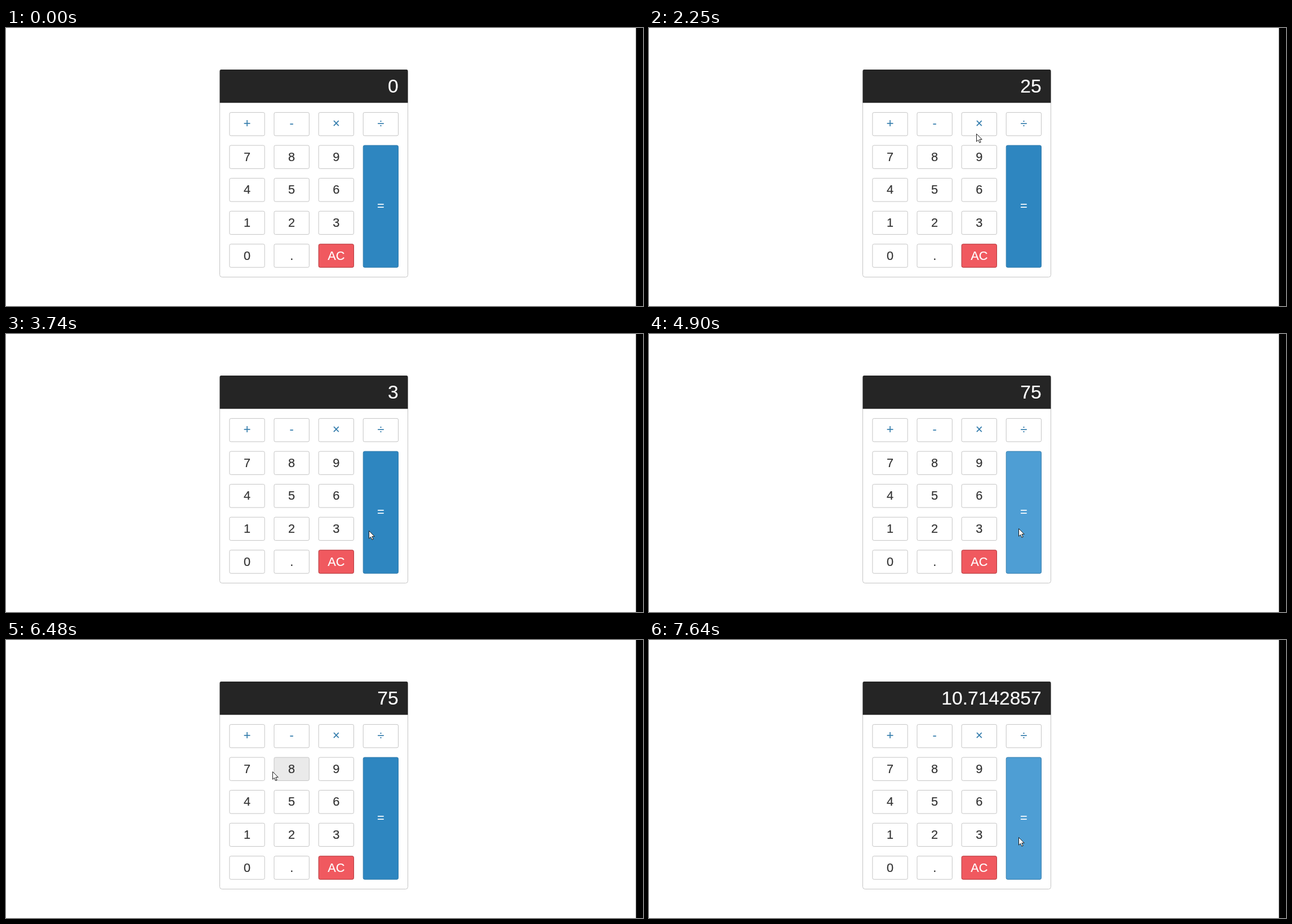
Animation of 1131 by 495 pixels, one loop 8 s. Source, as an HTML page:

```html
<!DOCTYPE html>
<html lang="en">
<head>
<meta charset="utf-8">
<title>Calculator</title>
<style>
  html, body { margin: 0; width: 100%; height: 100%; overflow: hidden; background: #fff; }
  svg { display: block; width: 100%; height: 100%; }
  text {
    font-family: "Liberation Sans", Arial, sans-serif; font-size: 21.7px; text-anchor: middle;
    fill: currentColor; stroke: currentColor; stroke-width: .2px;
  }
  #value { font-size: 33.6px; text-anchor: end; color: #fff; }
</style>
</head>
<body>
<svg viewBox="0 0 1131 495" xmlns="http://www.w3.org/2000/svg">
  <rect x="1118.5" width="12.5" height="495" fill="#000"/>
  <rect x="379.5" y="74.5" width="334" height="369" rx="4" fill="#fff" stroke="#c4c4c4"/>
  <path d="M379.500 133.200V76.500q0-2.500 2.500-2.500h329q2.500 0 2.500 2.500V133.200Z" fill="#252525"/>
  <text id="value" x="696.700" y="115"></text>
  <g id="keys"></g>
  <circle id="press" r="10.3" fill="#ff0" fill-opacity=".57"/>
  <path id="cursor" d="M.5.5V14.2L3.600 11.300 5.900 16.300 8.100 15.300 5.900 10.400H10.200Z"
        fill="#fff" stroke="#1c1c1c" stroke-linejoin="round"/>
</svg>
<script>
const LOOP = 8000, PRESS = 130, HOVER_LAG = 30;
const ENTRY = { time: 70, at: [940, 474] };
const $ = id => document.getElementById(id);
const themes = {
  digit: { fill: '#fff', hover: '#eaeaea', stroke: '#c4c4c4', ink: '#333' },
  op:    { fill: '#fff', hover: '#eaeaea', stroke: '#c4c4c4', ink: '#337cac' },
  clear: { fill: '#f0595f', hover: '#f17377', stroke: '#b0353a', ink: '#fff' },
  equal: { fill: '#2e86c0', hover: '#4e9ed4', stroke: '#337cac', ink: '#fff' }
};
const GAP_X = 79.1, GAP_Y = 58.6, KEY_W = 62.3, KEY_H = 41.4;
const keys = [];

function add(tag, attrs) {
  const el = document.createElementNS('http://www.w3.org/2000/svg', tag);
  for (const name in attrs) el.setAttribute(name, attrs[name]);
  return $('keys').appendChild(el);
}

function addKey(label, col, row, kind, rows = 1) {
  const theme = themes[kind];
  const x = 396.9 + GAP_X * col, y = 150.4 + GAP_Y * row;
  const h = KEY_H + GAP_Y * (rows - 1);
  const box = add('rect', { x, y, width: KEY_W, height: h, rx: 2.5, stroke: theme.stroke });
  const baseline = y + h / 2 + (kind === 'op' || kind === 'equal' ? 5.9 : 7);
  add('text', { x: x + KEY_W / 2, y: baseline, color: theme.ink }).textContent = label;
  const contains = ([px, py]) => px >= x && px <= x + KEY_W && py >= y && py <= y + h;
  keys.push({ box, theme, contains });
}

['+-×÷', '789', '456', '123', '0.'].forEach((line, row) =>
  [...line].forEach((label, col) => addKey(label, col, row, row ? 'digit' : 'op')));
addKey('AC', 2, 4, 'clear');
addKey('=', 3, 1, 'equal', 4);

// Each click: travel times, release time, resting point and optional bend of the way there
const clicks = [
  { key: '2', leave: 70,   arrive: 740,  release: 890,  at: [508, 345], bend: [660, 470] },
  { key: '5', leave: 820,  arrive: 990,  release: 1210, at: [509, 284] },
  { key: '×', leave: 1500, arrive: 2360, release: 2870, at: [580, 176], bend: [595, 330] },
  { key: '3', leave: 2870, arrive: 3260, release: 3470, at: [588, 345] },
  { key: '=', leave: 3610, arrive: 3790, release: 4170, at: [656, 351] },
  { key: '÷', leave: 4840, arrive: 5370, release: 5520, at: [663, 181] },
  { key: '7', leave: 5520, arrive: 6750, release: 6870, at: [430, 235], bend: [630, 235] },
  { key: '=', leave: 6870, arrive: 7400, release: 7640, at: [656, 351] }
];

const ease = u => (1 - Math.cos(Math.PI * Math.min(1, Math.max(0, u)))) / 2;

function tipAt(t) {
  const i = Math.max(0, clicks.findLastIndex(c => c.leave <= t));
  const { leave, arrive, at, bend } = clicks[i];
  const from = (clicks[i - 1] || ENTRY).at;
  const s = ease((t - leave) / (arrive - leave));
  return at.map((end, axis) => {
    const mid = bend ? bend[axis] : (from[axis] + end) / 2;
    return (1 - s) ** 2 * from[axis] + 2 * s * (1 - s) * mid + s * s * end;
  });
}

function displayAt(t) {
  let shown = '0', stored = 0, op = '', fresh = true;
  for (const { key, release } of clicks) {
    if (release > t) break;
    if (key === '=') {
      const result = op === '×' ? stored * shown : stored / shown;
      shown = String(result).slice(0, 10);
      fresh = true;
    } else if (key === '×' || key === '÷') {
      stored = Number(shown);
      op = key;
      fresh = true;
    } else {
      shown = fresh ? key : shown + key;
      fresh = false;
    }
  }
  return shown;
}

function place(id, [x, y], visible) {
  $(id).setAttribute('transform', `translate(${Math.round(x)} ${Math.round(y)})`);
  $(id).setAttribute('visibility', visible ? 'visible' : 'hidden');
}

function render(t) {
  const hot = tipAt(t - HOVER_LAG);
  for (const { box, theme, contains } of keys)
    box.setAttribute('fill', contains(hot) ? theme.hover : theme.fill);
  $('value').textContent = displayAt(t);
  place('cursor', tipAt(t), t >= ENTRY.time);
  const down = clicks.find(c => t >= c.release - PRESS && t < c.release);
  place('press', down ? down.at : ENTRY.at, down);
}

const start = performance.now();
function tick() {
  render((performance.now() - start) % LOOP);
  requestAnimationFrame(tick);
}
tick();
</script>
</body>
</html>
```
